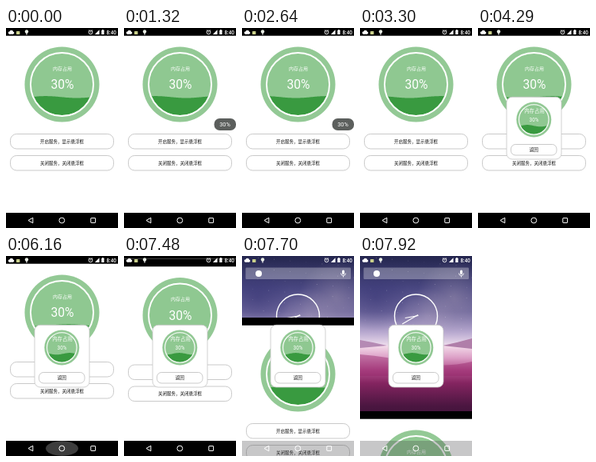
These frames come from a looping animation (141x250 px, 8 s). An HTML page with a canvas:

```html
<!DOCTYPE html>
<html lang="zh">
<head>
<meta charset="utf-8">
<style>
  html, body { margin: 0; width: 100%; height: 100%; overflow: hidden; background: #fff; }
  canvas { display: block; width: 100vw; height: 100vh; }
</style>
</head>
<body>
<canvas id="stage"></canvas>
<script>
const W = 141, H = 250, LOOP = 8000, TICK = 110;
const CJK = '"Noto Sans CJK SC", "Noto Sans CJK", sans-serif';
const LATIN = 'Roboto, sans-serif';
const canvas = document.getElementById('stage');
const c = canvas.getContext('2d');

// Each track: [time, value], held until the next entry.
const PILL_Y = [[0, null], [1100, 113], [3080, 119], [3190, 125], [3300, null]];
const POPUP = [[0, 0], [3630, 0.5], [3740, 1]];
const RIPPLE = [[0, 0], [6050, 0.5], [6160, 1], [6380, 0.8], [6600, 0.3], [6710, 0]];
const SLIDE = [[0, 0], [7480, 3.5], [7590, 35], [7700, 77], [7810, 130], [7920, 194]];
const LAUNCH = 7590;

function at(track, t) {
  let v = track[0][1];
  for (const [time, value] of track) if (t >= time) v = value;
  return v;
}

function box(x, y, w, h, r, fill, stroke, width = 0.8) {
  c.beginPath();
  c.roundRect(x, y, w, h, r);
  if (fill) { c.fillStyle = fill; c.fill(); }
  if (stroke) { c.strokeStyle = stroke; c.lineWidth = width; c.stroke(); }
}

function disc(x, y, r, fill, stroke, width = 1) {
  c.beginPath();
  c.arc(x, y, r, 0, Math.PI * 2);
  if (fill) { c.fillStyle = fill; c.fill(); }
  if (stroke) { c.strokeStyle = stroke; c.lineWidth = width; c.stroke(); }
}

function poly(points, fill) {
  c.beginPath();
  points.forEach(([x, y]) => c.lineTo(x, y));
  c.closePath();
  c.fillStyle = fill;
  c.fill();
}

function line(x0, y0, x1, y1, width) {
  c.beginPath();
  c.moveTo(x0, y0);
  c.lineTo(x1, y1);
  c.strokeStyle = '#fff';
  c.lineWidth = width;
  c.stroke();
}

function label(str, x, y, size, color, family = CJK, weight = 400) {
  c.font = `${weight} ${size}px ${family}`;
  c.textAlign = 'center';
  c.textBaseline = 'alphabetic';
  c.fillStyle = color;
  c.fillText(str, x, y);
}

// Round gauge whose liquid surface drifts to the left.
function gauge(x, y, outer, inner, ring, level, amp, length, crest, t) {
  disc(x, y, outer, '#93c995');
  c.save();
  c.beginPath();
  c.arc(x, y, inner, 0, Math.PI * 2);
  c.clip();
  c.fillStyle = '#8fc891';
  c.fillRect(x - inner, y - inner, inner * 2, inner * 2);
  c.beginPath();
  for (let px = x - inner; px <= x + inner; px++) {
    const phase = (px - crest + t * 0.008) / length;
    c.lineTo(px, level - amp * Math.cos(phase * Math.PI * 2));
  }
  c.lineTo(x + inner, y + inner);
  c.lineTo(x - inner, y + inner);
  c.fillStyle = '#399a40';
  c.fill();
  c.restore();
  disc(x, y, inner + ring / 2, null, '#fff', ring);
}

function button(x, y, w, h, str, size, weight) {
  box(x, y, w, h, h * 0.42, '#fff', '#bdbdbd');
  label(str, x + w / 2, y + h / 2 + size * 0.37, size, '#111', CJK, weight);
}

function app(t, dy) {
  c.save();
  c.translate(0, dy);
  c.fillStyle = '#fff';
  c.fillRect(0, 0, W, H);
  c.fillStyle = '#000';
  c.fillRect(0, 0, W, 9.7);
  gauge(70.5, 70.5, 47, 38.6, 1.9, 86.3, 1.2, 78, 50, t);
  label('内存占用', 71, 52.5, 6, '#fff');
  label('30%', 71, 76.2, 15.6, '#fff', LATIN);
  button(5.5, 132.5, 130, 18.5, '开启服务，显示悬浮框', 5.5, 500);
  button(5.5, 159.5, 130, 18.5, '关闭服务，关闭悬浮框', 5.5, 500);
  c.restore();
}

function popup(t, alpha) {
  c.save();
  c.globalAlpha = alpha;
  box(36, 86.3, 69, 77.7, 7, '#fff', '#c4c4c4');
  gauge(70.3, 114.5, 22, 18.2, 1.1, 122.2, 1.1, 33, 96.3, t);
  label('内存占用', 71, 106.2, 6.4, '#fff');
  label('30%', 70.5, 117.3, 6.4, '#fff', LATIN);
  button(41.5, 145.5, 57.5, 13.5, '返回', 5.6, 400);
  c.restore();
}

function shade(y0, y1, stops) {
  const g = c.createLinearGradient(0, y0, 0, y1);
  stops.forEach(([p, color]) => g.addColorStop(p, color));
  c.fillStyle = g;
  c.fillRect(0, y0, W, y1 - y0);
}

function glow(x, y, r, rgb, alpha) {
  const g = c.createRadialGradient(x, y, 0, x, y, r);
  g.addColorStop(0, `rgba(${rgb},${alpha})`);
  g.addColorStop(1, `rgba(${rgb},0)`);
  c.fillStyle = g;
  c.fillRect(x - r, y - r, r * 2, r * 2);
}

function hand(angle, length) {
  const a = angle * Math.PI / 180, sx = Math.sin(a), sy = -Math.cos(a);
  line(70.5 - sx * 3, 75 - sy * 3, 70.5 + sx * length, 75 + sy * length, 1.1);
}

function wallpaper() {
  shade(0, 112, [[0, '#24264e'], [0.35, '#484680'], [0.62, '#6c659b'], [0.85, '#b7a8cf'], [1, '#eedded']]);
  glow(118, 52, 46, '190,175,190', 0.35);
  glow(84, 76, 36, '200,185,205', 0.3);
  glow(20, 52, 42, '48,46,112', 0.4);
  for (let i = 1; i < 50; i++) {
    c.fillStyle = `rgba(255,255,255,${0.12 + (i % 4) * 0.08})`;
    c.fillRect((i * 53.7) % W, (i * 31.3) % 92, 0.8, 0.8);
  }
  shade(112, H, [[0, '#f3dcea'], [0.11, '#dc9fc6'], [0.22, '#b34f8c'], [0.34, '#842460'], [0.55, '#4a1640'], [1, '#2a0d28']]);
  poly([[0, 105], [16, 108], [34, 112], [0, 115]], '#b58ab4');
  poly([[141, 103], [122, 108], [104, 112], [141, 116]], '#b07ea9');
  c.beginPath();
  c.moveTo(0, 123);
  c.quadraticCurveTo(36, 126, 70, 134);
  c.quadraticCurveTo(108, 140, 141, 132);
  c.lineTo(141, 150);
  c.lineTo(0, 150);
  c.fillStyle = 'rgba(148,38,106,.45)';
  c.fill();
}

function home() {
  wallpaper();
  box(4.5, 14.5, 132.5, 14.5, 1.2, 'rgba(255,255,255,.3)');
  disc(21, 22, 4, '#fff');
  box(126, 17.5, 3, 5.4, 1.5, '#fff');
  c.beginPath();
  c.arc(127.5, 21.5, 3, 0, Math.PI);
  c.strokeStyle = '#fff';
  c.lineWidth = 0.9;
  c.stroke();
  line(127.5, 24.5, 127.5, 26.5, 0.9);
  disc(70.5, 75, 27, null, '#fff', 1.4);
  hand(260, 14);
  hand(240, 20);
}

function statusBar() {
  // cloud
  disc(4.5, 6, 1.7, '#fff');
  disc(6.8, 4.9, 2.2, '#fff');
  disc(8.8, 6.1, 1.5, '#fff');
  c.fillRect(4.5, 6, 4.3, 1.7);
  box(13, 4, 4.4, 4, 0.5, '#c9cf8a');
  // pin
  disc(26, 4.4, 2.2, '#e6eee2');
  line(26, 5, 26, 8.5, 1.2);
  // alarm
  disc(106.5, 5.4, 2.3, null, '#fff', 0.9);
  line(103.8, 3.6, 105.2, 2.4, 0.8);
  line(107.8, 2.4, 109.2, 3.6, 0.8);
  line(106.5, 4, 106.5, 5.8, 0.7);
  poly([[117.5, 2.3], [117.5, 8], [111.9, 8]], '#fff');
  box(120.2, 2.8, 3.3, 5.3, 0.4, '#fff');
  c.fillRect(121.1, 2, 1.5, 1);
  label('8:40', 132.6, 7.9, 6.3, '#fff', LATIN, 500);
}

function navBar(ripple, launched) {
  c.fillStyle = launched ? 'rgba(70,70,75,.3)' : '#000';
  c.fillRect(0, 231, W, 19);
  if (ripple) {
    c.beginPath();
    c.ellipse(70.5, 240.5, 20.5, 9.3, 0, 0, Math.PI * 2);
    c.fillStyle = `rgba(255,255,255,${0.24 * ripple})`;
    c.fill();
  }
  c.beginPath();
  c.moveTo(28, 240.5);
  c.lineTo(33.8, 237.2);
  c.lineTo(33.8, 243.8);
  c.closePath();
  c.strokeStyle = '#fff';
  c.lineWidth = 1;
  c.stroke();
  disc(70.3, 240.5, 3.4, null, '#fff');
  box(106.8, 237.6, 5.8, 5.8, 0.4, null, '#fff', 1);
}

function draw(t) {
  const dy = at(SLIDE, t), pillY = at(PILL_Y, t), shown = at(POPUP, t);
  const launched = t >= LAUNCH;
  c.fillStyle = '#000';
  c.fillRect(0, 0, W, H);
  if (launched) home();
  app(t, dy);
  statusBar();
  if (pillY !== null) {
    box(113.5, pillY, 27.5, 15, 7, '#5c5f5d');
    label('30%', 127, pillY + 10.2, 7.3, '#fff', LATIN);
  }
  navBar(at(RIPPLE, t), launched);
  if (shown) popup(t, shown);
}

function frame() {
  const ratio = window.devicePixelRatio || 1;
  const w = Math.round(innerWidth * ratio), h = Math.round(innerHeight * ratio);
  if (canvas.width !== w || canvas.height !== h) {
    canvas.width = w;
    canvas.height = h;
  }
  c.setTransform(w / W, 0, 0, h / H, 0, 0);
  const t = (performance.now() - start) % LOOP;
  draw(Math.floor((t + 0.5) / TICK) * TICK);
  requestAnimationFrame(frame);
}

const start = performance.now();
frame();
</script>
</body>
</html>
```
